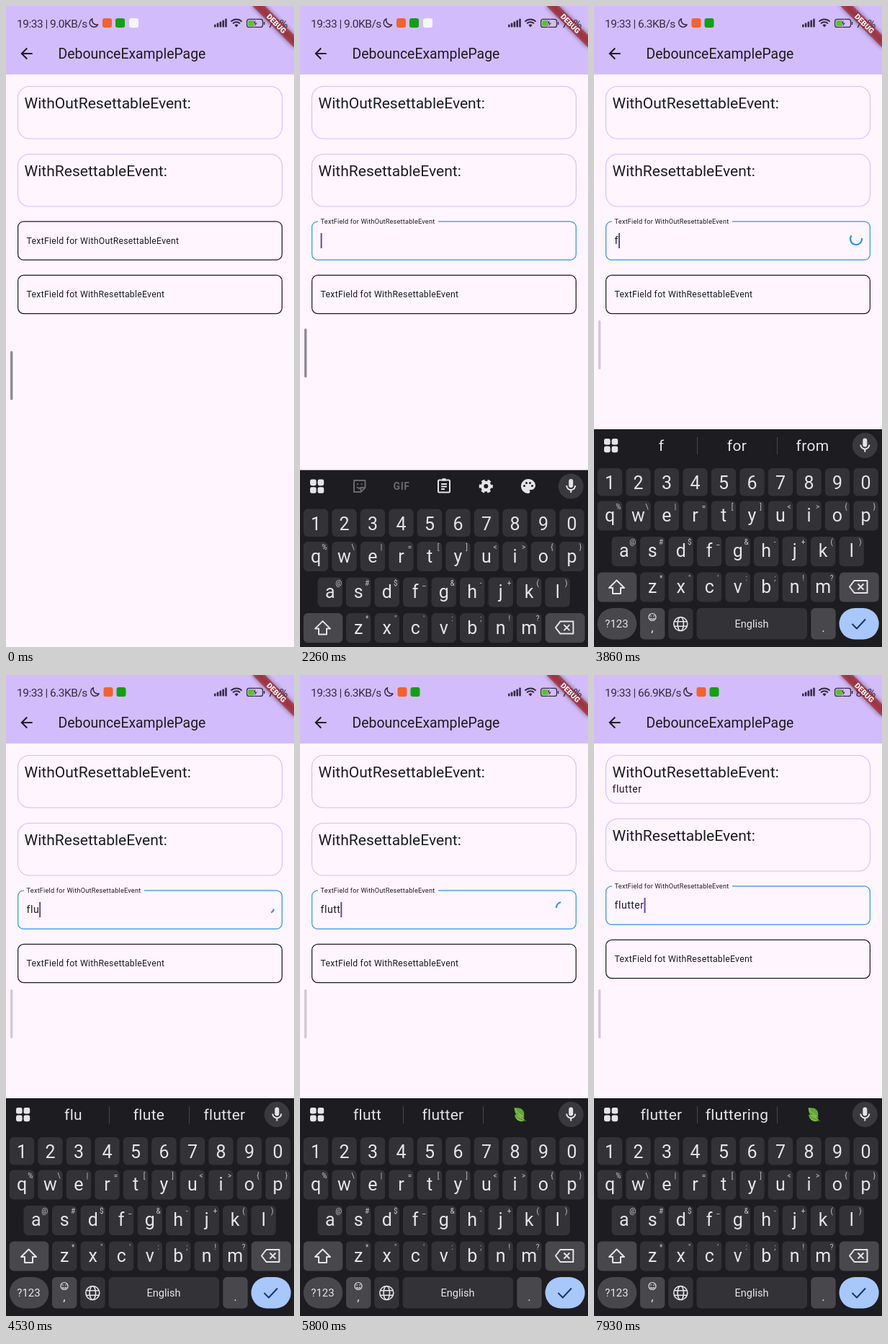
These frames come from a looping animation (400 by 889 pixels, 8000 ms). An HTML page:

```html
<!DOCTYPE html>
<html lang="en">
<head>
<meta charset="utf-8">
<title>Debounce example</title>
<style>
  html, body { margin: 0; width: 100%; height: 100%; overflow: hidden; background: #fef5ff; }
  svg { display: block; width: 100vw; height: 100vh; }
  text { font-family: Roboto, "Noto Sans", sans-serif; fill: #1d1b20; white-space: pre; }
  .bar { font-size: 15.5px; letter-spacing: -.5px; fill: #362c44; }
  .title { font-size: 19.4px; }
  .head { font-size: 21.05px; }
  .body { font-size: 14.02px; letter-spacing: .51px; }
  .label { font-size: 12.26px; letter-spacing: .255px; }
  .card { fill: none; stroke: #d3bffb; stroke-width: 1.1; }
  .box { fill: none; stroke: #1d1b20; stroke-width: 1.2; }
  #kb text { fill: #e6e4e9; text-anchor: middle; }
  #kb .key { font-size: 25px; }
  #kb .hint { font-size: 10px; fill: #c9c7cc; }
  #kb .word { font-size: 21px; letter-spacing: .3px; }
  .line { fill: none; stroke: #e6e4e9; stroke-width: 2; stroke-linejoin: round; }
  .solid { fill: #e6e4e9; }
  .ink { fill: none; stroke: #362c44; stroke-width: 1.5; }
</style>
</head>
<body>
<svg viewBox="0 0 400 889" preserveAspectRatio="none">
  <defs>
    <filter id="blur" x="-20%" y="-100%" width="140%" height="300%"><feGaussianBlur stdDeviation="3"/></filter>
  </defs>
  <rect width="400" height="889" fill="#fef5ff"/>
  <rect width="400" height="95" fill="#d3bcfc"/>

  <!-- status bar -->
  <text class="bar" x="15" y="29.5" id="net"></text>
  <g id="tray">
    <path class="ink" d="M120 17.6a6 6 0 1 0 7.6 8.2a6.3 6.3 0 0 1-7.6-8.2z" stroke-linejoin="round"/>
    <rect x="134" y="17" width="13" height="13" rx="3" fill="#f4622c"/>
    <rect x="152" y="17" width="13" height="13" rx="3" fill="#12a012"/>
    <rect id="extra" x="171" y="17" width="13" height="13" rx="3" fill="#f4f6fb"/>
  </g>
  <g id="signal" fill="#362c44"></g>
  <g class="ink" stroke-width="2">
    <path d="M312.4 21.6a10.8 10.8 0 0 1 15.2 0M315 24.4a7 7 0 0 1 10 0" stroke-width="2"/>
    <path d="M320 29.4l-2.6-2.8a3.7 3.7 0 0 1 5.2 0z" fill="#362c44" stroke="none"/>
    <rect x="334.6" y="18.4" width="22" height="11" rx="3" stroke-width="1.3"/>
    <path d="M358.6 22v4"/>
  </g>
  <rect x="336.3" y="20" width="9" height="7.8" rx="1.5" fill="#58c322"/>
  <path d="M347.2 18.6l-4.4 6h3l-1 4.8 4.6-6.2h-3.1z" fill="#362c44" stroke="#d3bcfc" stroke-width=".7"/>
  <text class="bar" x="363.5" y="29.5" id="charge"></text>

  <!-- app bar -->
  <path transform="translate(16.3 53.8) scale(1.0186)" fill="#1d1b20" d="M20 11H7.83l5.59-5.59L12 4l-8 8 8 8 1.41-1.41L7.83 13H20v-2z"/>
  <text class="title" x="72.6" y="73">DebounceExamplePage</text>
  <g transform="translate(400 0) rotate(45) scale(1.0186)">
    <rect x="-40" y="28" width="80" height="12" fill="#000" opacity=".5" filter="url(#blur)"/>
    <rect x="-40" y="28" width="80" height="12" fill="#b71c1c" fill-opacity=".63"/>
    <text y="37.6" text-anchor="middle" style="font-size:10.2px;font-weight:900;fill:#fff">DEBUG</text>
  </g>

  <!-- page -->
  <rect class="card" id="card1" x="16.5" y="111.5" width="367" height="72.5" rx="16"/>
  <text class="head" x="25.5" y="142">WithOutResettableEvent:</text>
  <text class="body" id="result" x="25.5" y="163">flutter</text>
  <g id="lower">
    <rect class="card" x="16.5" y="205.5" width="367" height="72.5" rx="16"/>
    <text class="head" x="25.5" y="236">WithResettableEvent:</text>
    <rect class="box" id="box1" x="16.6" y="298.8" width="366.8" height="53.4" rx="8"/>
    <rect id="gap" x="25" y="297" height="4" fill="#fef5ff"/>
    <text class="label" id="label">TextField for WithOutResettableEvent</text>
    <text class="body" id="typed" x="28.6" y="330"></text>
    <rect id="caret" y="315" width="2" height="21" fill="#5f4b9b"/>
    <path id="spin" fill="none" stroke="#2f93f0" stroke-width="2.2"/>
    <rect class="box" x="16.6" y="373.4" width="366.8" height="53.2" rx="8"/>
    <text class="label" x="28.6" y="404">TextField fot WithResettableEvent</text>
  </g>
  <rect id="handle" x="6" y="478.5" width="3.4" height="68" rx="1.7" fill="#7d7585"/>

  <!-- keyboard, drawn from its own top edge -->
  <g id="kb">
    <rect width="400" height="310" fill="#1d1c20"/>
    <g class="solid">
      <rect x="14" y="13" width="8.6" height="8.6" rx="2.4"/><rect x="24.6" y="13" width="8.6" height="8.6" rx="2.4"/>
      <rect x="14" y="23.6" width="8.6" height="8.6" rx="2.4"/><rect x="24.6" y="23.6" width="8.6" height="8.6" rx="2.4"/>
    </g>
    <circle cx="376.3" cy="22.5" r="17.5" fill="#3a393d"/>
    <path class="solid" transform="translate(364.3 10.5)" d="M12 14a3 3 0 0 0 3-3V5a3 3 0 0 0-6 0v6a3 3 0 0 0 3 3zM17 11a5 5 0 0 1-10 0H5a7 7 0 0 0 6 6.92V21h2v-3.08A7 7 0 0 0 19 11z"/>
    <g id="tools">
      <g opacity=".38">
        <path class="line" d="M75 14.5h15.5v10l-6 6H75zM90.500 24.500h-6v6"/>
        <circle class="solid" cx="80" cy="19.500" r="1.2"/><circle class="solid" cx="85.600" cy="19.500" r="1.2"/>
        <path class="line" stroke-width="1.5" d="M79 23.500q3.500 3.500 7 0"/>
        <text x="141" y="27.500" style="font-size:14px;font-weight:700;letter-spacing:.5px">GIF</text>
      </g>
      <g class="line">
        <rect x="192" y="14" width="16" height="17" rx="1.500"/>
        <path d="M196 19.500h8M196 23h8M196 26.500h5"/>
        <path d="M197.500 13.200h5" stroke-width="3.400"/>
      </g>
      <g class="line">
        <circle cx="258.300" cy="22.500" r="5.200" stroke-width="4.400"/>
        <circle cx="258.300" cy="22.500" r="8" stroke-width="3.200" stroke-dasharray="4.600 3.778" stroke-dashoffset="2.300"/>
      </g>
      <g transform="translate(305 10.500)">
        <path class="solid" d="M12 2C6.490 2 2 6.490 2 12s4.490 10 10 10c1.380 0 2.500-1.120 2.500-2.500 0-.61-.23-1.200-.64-1.670-.08-.1-.13-.21-.13-.33 0-.28.22-.5.5-.5H16c3.310 0 6-2.690 6-6C22 6.040 17.510 2 12 2z"/>
        <g fill="#1d1c20"><circle cx="6.500" cy="11.500" r="1.500"/><circle cx="9.500" cy="7.500" r="1.500"/><circle cx="14.500" cy="7.500" r="1.500"/><circle cx="17.500" cy="11.500" r="1.500"/></g>
      </g>
    </g>
    <g id="hints">
      <path d="M143.500 11v24M254.500 11v24" stroke="#48474c"/>
      <text class="word" x="93.500" y="30"></text>
      <text class="word" x="198.500" y="30"></text>
      <text class="word" x="303.500" y="30"></text>
      <g id="leaf">
        <path d="M298 13.500c9-1.500 15 3 13 12c-8 1-14-3-13-12z" fill="#5fa83c"/>
        <path d="M298 13.500c3 6 7 9 13.500 13" fill="none" stroke="#a5d36b"/>
        <path d="M298 23c7-1 12 2 14.500 8c-7 3-13 0-14.500-8z" fill="#7cb93f"/>
        <path d="M298 23c4 4 8 6 16 8.500" fill="none" stroke="#3f8430"/>
      </g>
    </g>
    <g id="keys"></g>
    <g class="line">
      <path d="M31.500 209.500l10.500 10.500h-5v8h-11v-8h-5z"/>
      <path d="M361.500 210h18v17h-18l-6.500-8.500zM366.500 214.500l8 8M374.500 214.500l-8 8"/>
      <g stroke-width="1.600">
        <circle cx="120.300" cy="270" r="9.500"/><ellipse cx="120.300" cy="270" rx="4.200" ry="9.500"/>
        <path d="M111.500 266.700h17.600M111.500 273.300h17.600"/>
      </g>
      <g stroke-width="1.200"><circle cx="81" cy="260.500" r="5"/><path d="M78.300 262q2.700 3 5.400 0M79 258.300v1.400M83 258.300v1.400"/></g>
      <path d="M358.500 270l6.500 6.500 12-13" stroke="#17366b" style="stroke:#17366b"/>
    </g>
  </g>
</svg>
<script>
const LOOP = 8000;
const FOCUS = 2070, TYPE = 3500, DONE = 7550;
const $ = id => document.getElementById(id);
const set = (el, attrs) => { for (const k in attrs) el.setAttribute(k, attrs[k]); return el; };
const add = (parent, tag, attrs, text) => {
  const el = set(document.createElementNS('http://www.w3.org/2000/svg', tag), attrs);
  if (text) el.textContent = text;
  return parent.appendChild(el);
};
const clamp = x => Math.min(1, Math.max(0, x));
const span = (t, from, length) => clamp((t - from) / length);
const mix = (a, b, p) => a + (b - a) * p;
const show = (el, on) => el.setAttribute('visibility', on ? 'visible' : 'hidden');
const latest = (list, t) => list.reduce((best, item) => item[0] <= t ? item : best);

// cubic-bezier(.4, 0, .2, 1)
function ease(x) {
  let lo = 0, hi = 1;
  for (let i = 0; i < 20; i++) {
    const s = (lo + hi) / 2, r = 1 - s;
    if (1.2 * r * r * s + 0.6 * r * s * s + s ** 3 < x) lo = s; else hi = s;
  }
  return lo * lo * (3 - 2 * lo);
}

// status bar signal
for (let i = 0; i < 5; i++) {
  const h = 4 + i * 2;
  add($('signal'), 'rect', { x: 289 + i * 3.8, y: 29.5 - h, width: 2.6, height: h, rx: 1 });
}

// keyboard keys
const keys = $('keys');
const key = (x, y, w, h, fill = '#333337', rx = 6) =>
  add(keys, 'rect', { x, y, width: w, height: h, rx, fill });
const rows = [
  ['1234567890', '', 22, 54, 38.5, 83],
  ['qwertyuiop', '%\\|=[]<>{}', 22, 99.5, 41, 128],
  ['asdfghjkl', '@#$_&-+()', 41.7, 149, 41, 177],
  ['zxcvbnm', '*"\':;!?', 81.2, 198.5, 41, 227]
];
for (const [chars, hints, start, top, height, base] of rows) {
  [...chars].forEach((c, i) => {
    const x = start + i * 39.5;
    key(x - 17.2, top, 34.4, height);
    add(keys, 'text', { class: 'key', x, y: base }, c);
    if (hints) add(keys, 'text', { class: 'hint', x: x + 12, y: top + 11 }, hints[i]);
  });
}
key(4.8, 198.5, 54.5, 41, '#48474c');
key(340.700, 198.5, 55, 41, '#48474c');
key(4.8, 248, 54.5, 43.5, '#48474c', 21.75);
key(64, 248, 34.400, 43.5, '#48474c');
key(103.200, 248, 34.400, 43.5);
key(142.500, 248, 153.500, 43.5);
key(301.300, 248, 34.400, 43.5, '#48474c');
key(340.500, 248, 55.200, 43.5, '#a8c7fa', 21.75);
const caption = (x, y, size, text) => add(keys, 'text', { x, y, 'font-size': size }, text);
caption(31.500, 275, 15, '?123');
caption(219, 275, 14.6, 'English');
caption(81, 281, 17, ',');
caption(318.500, 281, 17, '.');

// [time, tray shift, text]
const net = [[0, 0, '9.0KB/s'], [2460, 1.5, '6.3KB/s'], [6460, 8.5, '66.9KB/s']];
// [time, typed text, suggestions]; no third word shows the leaf
const typing = [
  [0, '', []],
  [TYPE, 'f', ['f', 'for', 'from']],
  [4050, 'fl', ['fl', 'fly', 'flu']],
  [4500, 'flu', ['flu', 'flute', 'flutter']],
  [4950, 'flut', ['flut', 'flutter']],
  [5450, 'flutt', ['flutt', 'flutter']],
  [6000, 'flutte', ['flutte', 'flutter']],
  [6550, 'flutter', ['flutter', 'fluttering']]
];
const words = document.querySelectorAll('.word');

function drawSpinner(ms) {
  const p = ms / 1333 % 1, turn = ms / 2222 % 1;
  const head = ease(clamp(p * 2)), tail = ease(clamp(p * 2 - 1));
  const from = Math.PI * (-0.5 + 1.5 * tail + 2 * turn + 0.5 * p);
  const sweep = Math.max(0.001, 1.5 * Math.PI * (head - tail));
  const at = a => `${364 + 8 * Math.cos(a)} ${323 + 8 * Math.sin(a)}`;
  $('spin').setAttribute('d', `M${at(from)}A8 8 0 ${+(sweep > Math.PI)} 1 ${at(from + sweep)}`);
}

function draw(t) {
  const [, shift, rate] = latest(net, t);
  $('net').textContent = '19:33 | ' + rate;
  $('tray').setAttribute('transform', `translate(${shift} 0)`);
  show($('extra'), shift === 0);
  $('charge').textContent = t < 7460 ? '79%' : '80%';

  const done = t >= DONE;
  $('card1').setAttribute('height', done ? 66.5 : 72.5);
  $('lower').setAttribute('transform', `translate(0 ${done ? -6 : 0})`);
  show($('result'), done);

  const f = ease(span(t, FOCUS, 167));
  $('label').setAttribute('transform', `translate(28.6 ${mix(329.5, 302.2, f)}) scale(${mix(1, 0.75, f)})`);
  $('gap').setAttribute('width', 167 * f);
  $('box1').style.stroke = `rgb(${mix(29, 47, f)},${mix(27, 147, f)},${mix(32, 240, f)})`;

  const [since, text, tips] = latest(typing, t);
  $('typed').textContent = text;
  const blinkFrom = text ? since : FOCUS;
  show($('caret'), t >= FOCUS && (t - blinkFrom) % 1000 < 500);
  $('caret').setAttribute('x', 28.6 + (text ? $('typed').getComputedTextLength() : 0));

  const busy = t >= TYPE && !done;
  show($('spin'), busy);
  if (busy) drawSpinner(t - TYPE);

  const up = 1 - (1 - span(t, 2060, 470)) ** 3;
  $('kb').setAttribute('transform', `translate(0 ${889 - 302 * up})`);
  show($('tools'), !text);
  show($('hints'), text);
  show($('leaf'), tips.length === 2);
  words.forEach((w, i) => { w.textContent = tips[i] || ''; });

  const slide = 1 - (1 - span(t, 2060, 560)) ** 3;
  set($('handle'), {
    transform: `translate(0 ${-42.5 * slide})`,
    opacity: mix(0.85, 0.34, span(t, 2340, 360))
  });
}

function tick() {
  draw(performance.now() % LOOP);
  requestAnimationFrame(tick);
}
tick();
</script>
</body>
</html>
```
